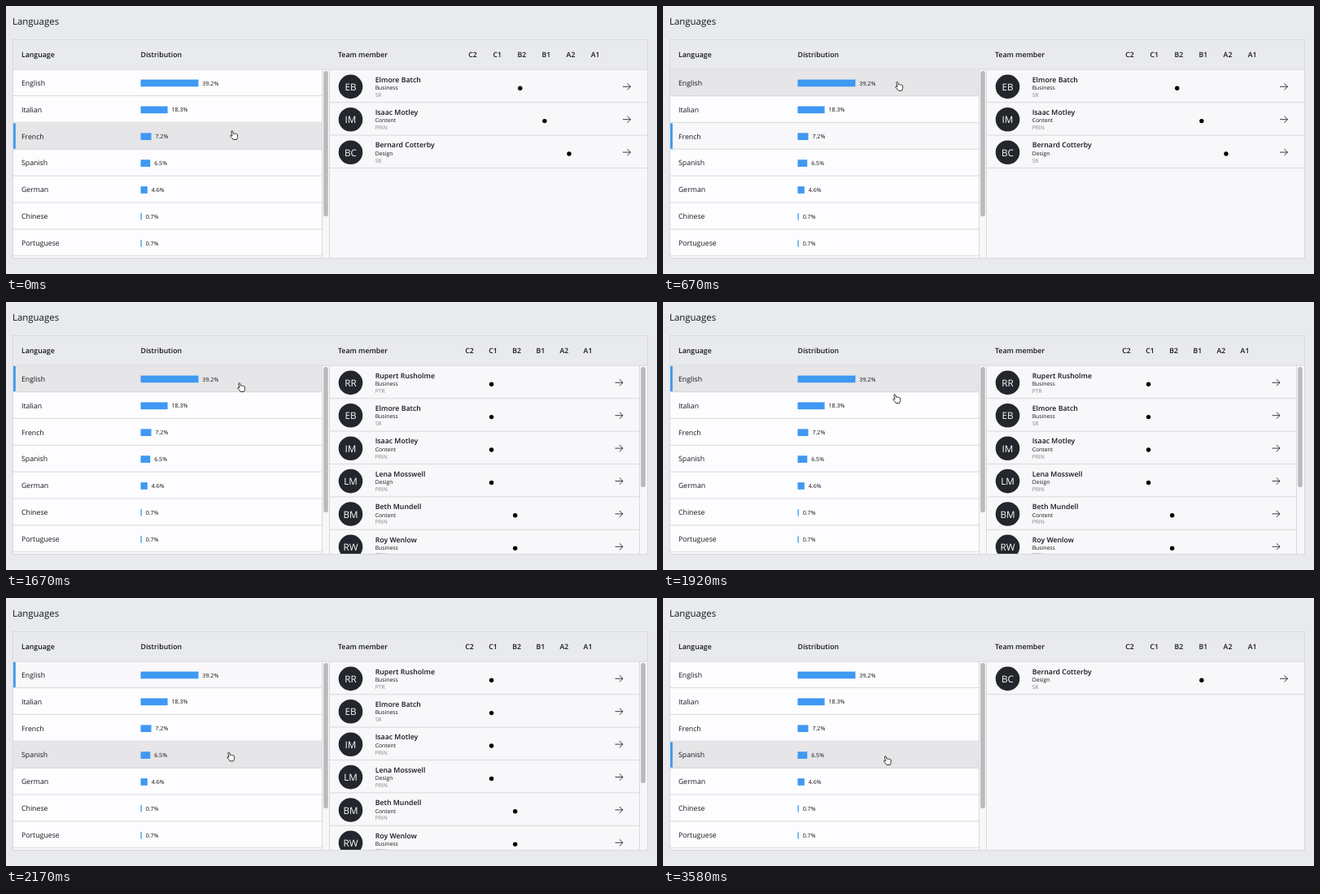
Animation, 800 px wide and 330 px high, one loop 4010 ms. Source, as an HTML page:

```html
<!DOCTYPE html>
<html lang="en">
<head>
<meta charset="utf-8">
<title>Languages</title>
<style>
html, body { margin: 0; width: 100%; height: 100%; overflow: hidden; background: #e8eaed; }
svg { display: block; width: 800px; height: 330px; }
text { font: 8.75px "Open Sans", "Noto Sans", sans-serif; fill: #14161b; text-rendering: geometricPrecision; }
.title { font-size: 11.45px; }
.bold { font-weight: 600; }
.percent { font-size: 7.1px; }
.dept { font-size: 6.8px; }
.rank { font-size: 6.7px; fill: #85868b; }
.initials { font-size: 11.7px; fill: #fff; text-anchor: middle; }
.level { font-weight: 600; text-anchor: middle; }
.line { stroke: #d8d9dc; }
.thumb { fill: #bab9bc; }
.arrow { fill: none; stroke: #26282d; stroke-width: .9; }
</style>
</head>
<body>
<svg id="stage" viewBox="0 0 800 330"></svg>
<script>
const LOOP = 4010;
const ROW = 32.88, MEMBER_ROW = 40.4, TOP = 78;
const BLUE = '#3f98f2';

const languages = [
  ['English', 39.2], ['Italian', 18.3], ['French', 7.2], ['Spanish', 6.5],
  ['German', 4.6], ['Chinese', 0.7], ['Portuguese', 0.7]
];
const levels = ['C2', 'C1', 'B2', 'B1', 'A2', 'A1'];

const people = {
  RR: ['Rupert Rusholme', 'Business', 'PTR'],
  EB: ['Elmore Batch', 'Business', 'SR'],
  IM: ['Isaac Motley', 'Content', 'PRIN'],
  LM: ['Lena Mosswell', 'Design', 'PRIN'],
  BM: ['Beth Mundell', 'Content', 'PRIN'],
  RW: ['Roy Wenlow', 'Business', 'PRIN'],
  BC: ['Bernard Cotterby', 'Design', 'SR']
};
// Selected language index -> members and their levels
const teams = {
  0: [['RR', 'C1'], ['EB', 'C1'], ['IM', 'C1'], ['LM', 'C1'], ['BM', 'B2'], ['RW', 'B2']],
  2: [['EB', 'B2'], ['IM', 'B1'], ['BC', 'A2']],
  3: [['BC', 'B1']]
};

// Each step: start time in ms, then the value held until the next step
const cursorSteps = [
  [0, 275, 153], [80, 275, 153.5],
  [670, 285, 92.7], [750, 285.5, 80], [830, 286, 73], [920, 286, 79],
  [1000, 285, 90], [1080, 284.5, 96], [1170, 284, 99],
  [1920, 282, 113], [2000, 277, 153], [2080, 273, 184], [2170, 271, 189.3],
  [2250, 270.4, 192], [2330, 270, 193.4], [2420, 270, 194], [3170, 270.6, 194]
];
const hoverSteps = [[0, 2], [670, 0], [2000, 1], [2080, 2], [2170, 3]];
const selectSteps = [[0, 2], [1500, 0], [3080, 3]];

function add(parent, tag, attrs = {}, content) {
  const node = document.createElementNS('http://www.w3.org/2000/svg', tag);
  for (const key in attrs) node.setAttribute(key, attrs[key]);
  if (content !== undefined) node.textContent = content;
  return parent.appendChild(node);
}
const rect = (parent, x, y, width, height, fill, extra) =>
  add(parent, 'rect', { x, y, width, height, fill, ...extra });
const label = (parent, x, y, content, style = '') =>
  add(parent, 'text', { x, y, class: style }, content);
const line = (parent, x1, y1, x2, y2) =>
  add(parent, 'line', { x1, y1, x2, y2, class: 'line' });
const thumb = (parent, x, height) =>
  add(parent, 'rect', { x, y: 80, width: 5.6, height, rx: 2.8, class: 'thumb' });

const stage = document.getElementById('stage');
const clip = add(add(stage, 'defs'), 'clipPath', { id: 'body' });
rect(clip, 8, TOP, 781, 232.5);

rect(stage, 0, 0, 800, 330, '#e8eaed');
label(stage, 8, 23.4, 'Languages', 'title');
rect(stage, 8.5, 41.5, 780, 269, '#e9eaed');
label(stage, 19, 63.2, 'Language', 'bold');
label(stage, 165.5, 63.2, 'Distribution', 'bold');
label(stage, 408, 63.2, 'Team member', 'bold');

const body = add(stage, 'g', { 'clip-path': 'url(#body)' });
rect(body, 9, TOP, 380, 233, '#fdfcfe');
rect(body, 389, TOP, 400, 233, '#f8f7f9');

const rows = languages.map(([name, percent], i) => {
  const y = TOP + i * ROW;
  const back = rect(body, 9, y + .5, 379.5, ROW, 'none');
  const marker = rect(body, 9, y + .7, 2.8, ROW - .9, BLUE);
  const width = percent * 1.81;
  line(body, 9, y + ROW - .4, 388.5, y + ROW - .4);
  label(body, 19, y + 19.8, name);
  rect(body, 165.5, y + 12.6, width, 8.7, BLUE);
  label(body, 170.4 + width, y + 19.6, percent + '%', 'percent');
  return { back, marker };
});
line(body, 388.5, TOP, 388.5, 311);
thumb(body, 390.2, 179);

function buildTeam(members) {
  const group = add(stage, 'g');
  const list = add(group, 'g', { 'clip-path': 'url(#body)' });
  const scrolls = members.length > 5;
  const right = scrolls ? 778.5 : 788.5;
  const levelX = i => scrolls ? 569.5 + i * 29.1 : 573.6 + i * 30.1;
  const arrowX = scrolls ? 748.5 : 758;

  levels.forEach((name, i) => label(group, levelX(i), 63.2, name, 'level'));
  members.forEach(([initials, level], i) => {
    const y = TOP + i * MEMBER_ROW;
    const [name, dept, rank] = people[initials];
    add(list, 'circle', { cx: 423.5, cy: y + 21.4, r: 14.8, fill: '#23262d' });
    label(list, 423.5, y + 25.9, initials, 'initials');
    label(list, 453.7, y + 15.6, name, 'bold');
    label(list, 453.7, y + 24.9, dept, 'dept');
    label(list, 453.7, y + 33.8, rank, 'rank');
    add(list, 'circle', { cx: levelX(levels.indexOf(level)) - 2, cy: y + 23.2, r: 2.7, fill: '#000' });
    add(list, 'path', { d: `M${arrowX} ${y + 21.3}h9.6m-4.2-4 4.2 4-4.2 4`, class: 'arrow' });
    line(list, 398, y + MEMBER_ROW + .3, right, y + MEMBER_ROW + .3);
  });
  if (scrolls) {
    line(list, 778.5, TOP, 778.5, 311);
    thumb(list, 780.2, 148);
  }
  return group;
}
const teamViews = Object.entries(teams).map(([key, members]) => [Number(key), buildTeam(members)]);

line(stage, 8.5, 78.2, 788.5, 78.2);
line(stage, 397.5, TOP, 397.5, 311);
rect(stage, 8.5, 41.5, 780, 269, 'none', { class: 'line' });

const cursor = add(stage, 'path', {
  d: 'M3 7 1.9 2C1.6.4 3.3.2 3.7 1.6L4.5 4.3C5.1 3.6 6 3.8 6.3 4.5 7 3.9 7.8 4.2 8 4.9' +
     ' 8.8 4.5 9.6 5 9.6 5.9 9.7 8 9.4 9.6 8.5 11.5H4.3C3.5 9.9 1.9 8.8.8 7.4.3 6.5 1.5 5.8 2.2 6.4Z',
  fill: '#fff', stroke: '#111', 'stroke-width': .85, 'stroke-linejoin': 'round'
});

const valueAt = (steps, time) => steps.findLast(step => step[0] <= time).slice(1);

function draw() {
  const time = performance.now() % LOOP;
  const [x, y] = valueAt(cursorSteps, time);
  const [hovered] = valueAt(hoverSteps, time);
  const [selected] = valueAt(selectSteps, time);

  cursor.setAttribute('transform', `translate(${x} ${y})`);
  rows.forEach(({ back, marker }, i) => {
    back.setAttribute('fill', i === hovered ? '#e6e5e7' : i === selected ? '#f8f7f9' : 'none');
    marker.setAttribute('visibility', i === selected ? 'visible' : 'hidden');
  });
  teamViews.forEach(([key, view]) =>
    view.setAttribute('visibility', key === selected ? 'visible' : 'hidden'));
  requestAnimationFrame(draw);
}
draw();
</script>
</body>
</html>
```
